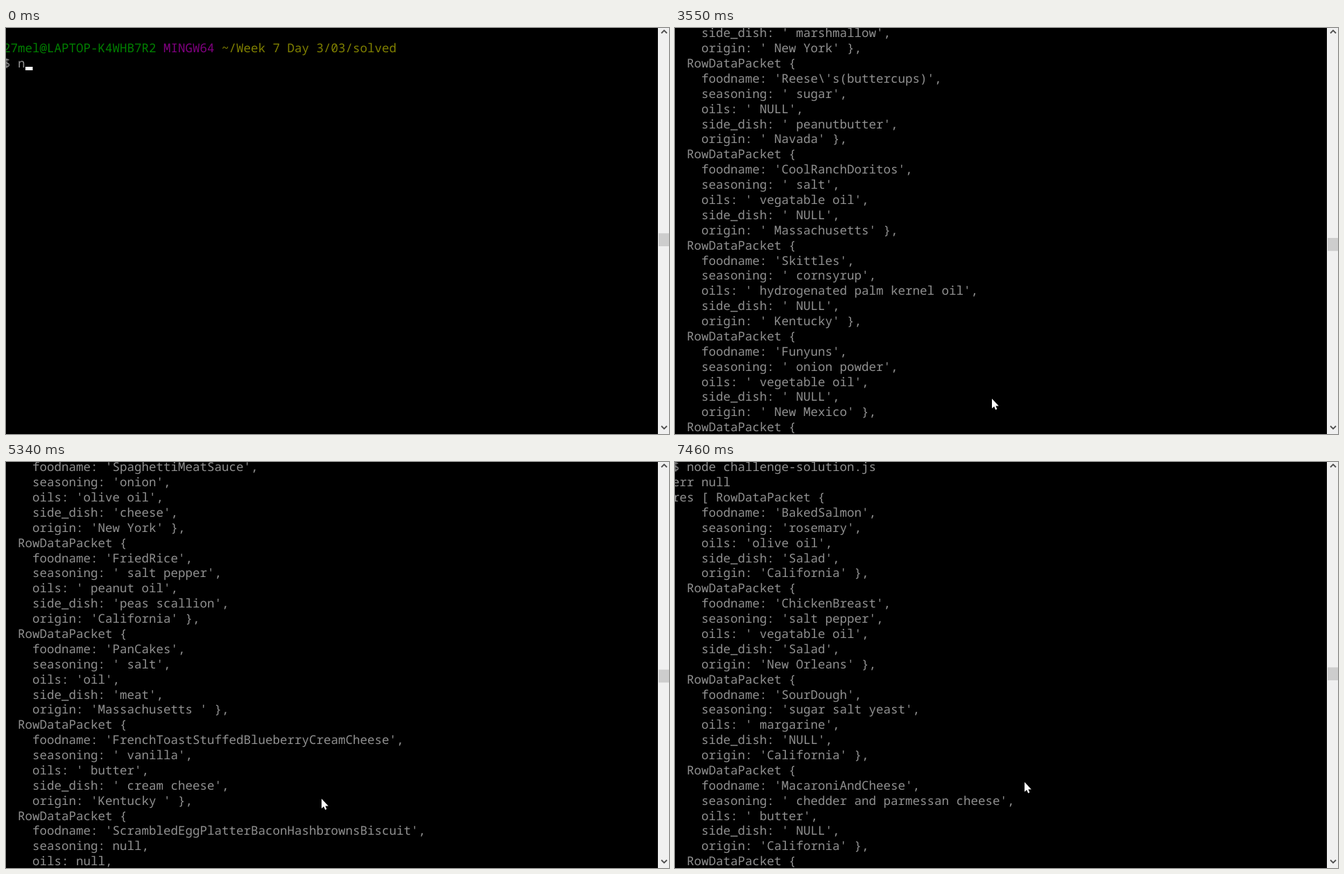
Recreate the animation shown at these times as an HTML page. Size 956 px wide and 586 px high, loop 8 s.

```html
<!DOCTYPE html>
<html lang="en">
<head>
<meta charset="utf-8">
<title>Terminal</title>
<style>
  html, body { margin: 0; width: 100%; height: 100%; overflow: hidden; background: #000; }
  svg { display: block; }
  text {
    font: 450 17.5px "Noto Sans Mono", "DejaVu Sans Mono", monospace;
    white-space: pre;
    text-rendering: geometricPrecision;
    fill: #909090;
  }
  .user { fill: #008000; }
  .sys { fill: #800080; }
  .path { fill: #808000; }
  .chevron { fill: none; stroke: #505050; stroke-width: 1.8; }
</style>
</head>
<body>
<svg width="956" height="586" viewBox="0 0 956 586">
  <rect width="956" height="586"/>
  <text id="prompt" x="-4" y="35"><tspan class="user">27mel@LAPTOP-K4WHB7R2</tspan> <tspan class="sys">MINGW64</tspan> <tspan class="path">~/Week 7 Day 3/03/solved</tspan></text>
  <g id="rows"></g>
  <rect id="caret" width="10.5" height="5" fill="#fff"/>
  <rect x="940" width="16" height="586" fill="#f0f0f0"/>
  <rect id="thumb" x="941" width="15" height="18.7" fill="#cdcdcd"/>
  <path class="chevron" d="M945 7.5l4-4 4 4M945 574.5l4 4 4-4"/>
  <path id="mouse" d="M0 0V14L3.2 11.2 5.2 16 7.4 15 5.4 10.4H9.8Z" fill="#fff" stroke="#000" paint-order="stroke"/>
</svg>
<script>
const LOOP = 8000, ROWS = 27, COL = 10.5, LEFT = -4, LINE = 21.88;
const ENTER = 1550, RUN = 1860, STEP = 75;
const command = '$ node challenge-solution.js';

// foodname | seasoning | oils | side_dish | origin
const foods = String.raw`BakedSalmon|rosemary|olive oil|Salad|California
ChickenBreast|salt pepper| vegatable oil|Salad|New Orleans
SourDough|sugar salt yeast| margarine|NULL|California
MacaroniAndCheese| chedder and parmessan cheese| butter| NULL|California
po boy|cajin salt|pearnut oil|NULL|New Orleans 
BeanCheeseBurrito|chilli garlic cumin|NULL|NULL|New Mexico
ClamChowder|salt pepper|butter|bread|Massachusetts
GrilledCheese|salt|butter|soup|New York
ChickenCurry|garlic cumin|canola oil|rice|California
SpaghettiMeatSauce|onion|olive oil|cheese|New York
FriedRice| salt pepper| peanut oil|peas scallion|California
PanCakes| salt|oil|meat|Massachusetts 
FrenchToastStuffedBlueberryCreamCheese| vanilla| butter| cream cheese|Kentucky 
ScrambledEggPlatterBaconHashbrownsBiscuit|null|null|null|null
BurritoEnchiladoSteak|salt pepper| canola oil| rice|New Mexico
Calzones| salt| vegatable oil||NULL
WholePepperoniPizza| basil tomato| olive oil| wings| Chicago
Oreos| sugar| canola oil| milk| Texas
HotChocolate| sugar| NULL| marshmallow| New York
Reese\'s(buttercups)| sugar| NULL| peanutbutter| Navada
CoolRanchDoritos| salt| vegatable oil| NULL| Massachusetts
Skittles| cornsyrup| hydrogenated palm kernel oil| NULL| Kentucky
Funyuns| onion powder| vegetable oil| NULL| New Mexico
GrahamCracker| sugar| soybean oil| chocolate| Montana
WheatThins| salt| canola oil| dip| Navada
GoldFish|salt| cegetable oil| NULL| New Orleans
FrenchFry|salt|hydrogenated soybean oil| ketchup| Texas
SlimJim| salt| soybean oil| NULL| Mexico
PorkRinds| salt| NULL| NULL| Texas
TrailMix| salt| peanut oil| NULL| Montana`.split('\n');

const fields = ['foodname', 'seasoning', 'oils', 'side_dish', 'origin'];
const quote = v => v === 'null' ? v : `'${v}'`;
const output = [command, 'err null'];
foods.forEach((food, i) => {
  output.push((i ? '  ' : 'res [ ') + 'RowDataPacket {');
  food.split('|').forEach((v, j) => {
    const end = j < 4 ? ',' : i < foods.length - 1 ? ' },' : ' } ]';
    output.push(`    ${fields[j]}: ${quote(v)}${end}`);
  });
});

// keystrokes after "$ n"; the last one completes the file name
const keystrokes = [170, 320, 400, 780, 850];
const COMPLETE = 1090;
const blinks = [400, 780, 920, COMPLETE, 1470, ENTER, 2480];

// wheel bursts: start time, number of steps
const bursts = [
  [2710, 5], [3160, 2], [3550, 2], [3860, 3], [4250, 3], [4710, 2],
  [5110, 6], [5720, 7], [6360, 3], [6830, 2], [7150, 5]
];
// wheel steps so far, top line, pointer x and y
const route = [
  [0, 156, 459, 543],
  [3, 144, 459, 539],
  [8, 114, 457, 535],
  [15, 81, 461, 505],
  [21, 57, 455, 486],
  [34, 12, 499, 464],
  [40, 0, 504, 462]
];

const $ = id => document.getElementById(id);
const set = (el, attrs) => { for (const k in attrs) el.setAttribute(k, attrs[k]); };
const show = (el, on) => set(el, { visibility: on ? 'visible' : 'hidden' });
const countUpTo = (times, t) => times.filter(k => k <= t).length;

const rows = Array.from({ length: ROWS }, (_, i) => {
  const row = document.createElementNS('http://www.w3.org/2000/svg', 'text');
  set(row, { x: LEFT, y: Math.round(13.3 + LINE * i) });
  return $('rows').appendChild(row);
});

function write(lines) {
  rows.forEach((row, i) => {
    const s = lines[i] || '';
    if (row.textContent !== s) row.textContent = s;
  });
}

function wheelSteps(t) {
  return bursts.reduce((sum, [from, n]) =>
    sum + Math.max(0, Math.min(n, 1 + Math.floor((t - from) / STEP))), 0);
}

function along(steps) {
  const i = Math.max(1, route.findIndex(k => k[0] >= steps));
  const a = route[i - 1], b = route[i];
  const p = (steps - a[0]) / (b[0] - a[0]);
  return a.map((v, j) => v + (b[j] - v) * p);
}

function draw(t) {
  const running = t >= RUN;
  const steps = wheelSteps(t);
  let top = -2, col = 0, row = ROWS - 1;
  if (running) {
    const [, line, x, y] = along(steps);
    top = Math.round(line / 3) * 3;
    write(output.slice(top, top + ROWS));
    set($('mouse'), { transform: `translate(${Math.round(x)} ${Math.round(y)})` });
  } else {
    const typed = t < COMPLETE ? 3 + countUpTo(keystrokes, t) : command.length + 1;
    write(['', '', command.slice(0, typed)]);
    [col, row] = t < ENTER ? [typed, 2] : [0, 3];
  }
  show($('prompt'), !running);
  show($('mouse'), steps > 0);
  show($('caret'), countUpTo(blinks, t) % 2 === 0);
  set($('caret'), { x: Math.round(LEFT + col * COL), y: Math.round(12.3 + LINE * row) });
  set($('thumb'), { y: 296.4 + 0.058 * top });
}

const start = performance.now();
function tick() {
  draw((performance.now() - start) % LOOP);
  requestAnimationFrame(tick);
}
tick();
</script>
</body>
</html>
```
